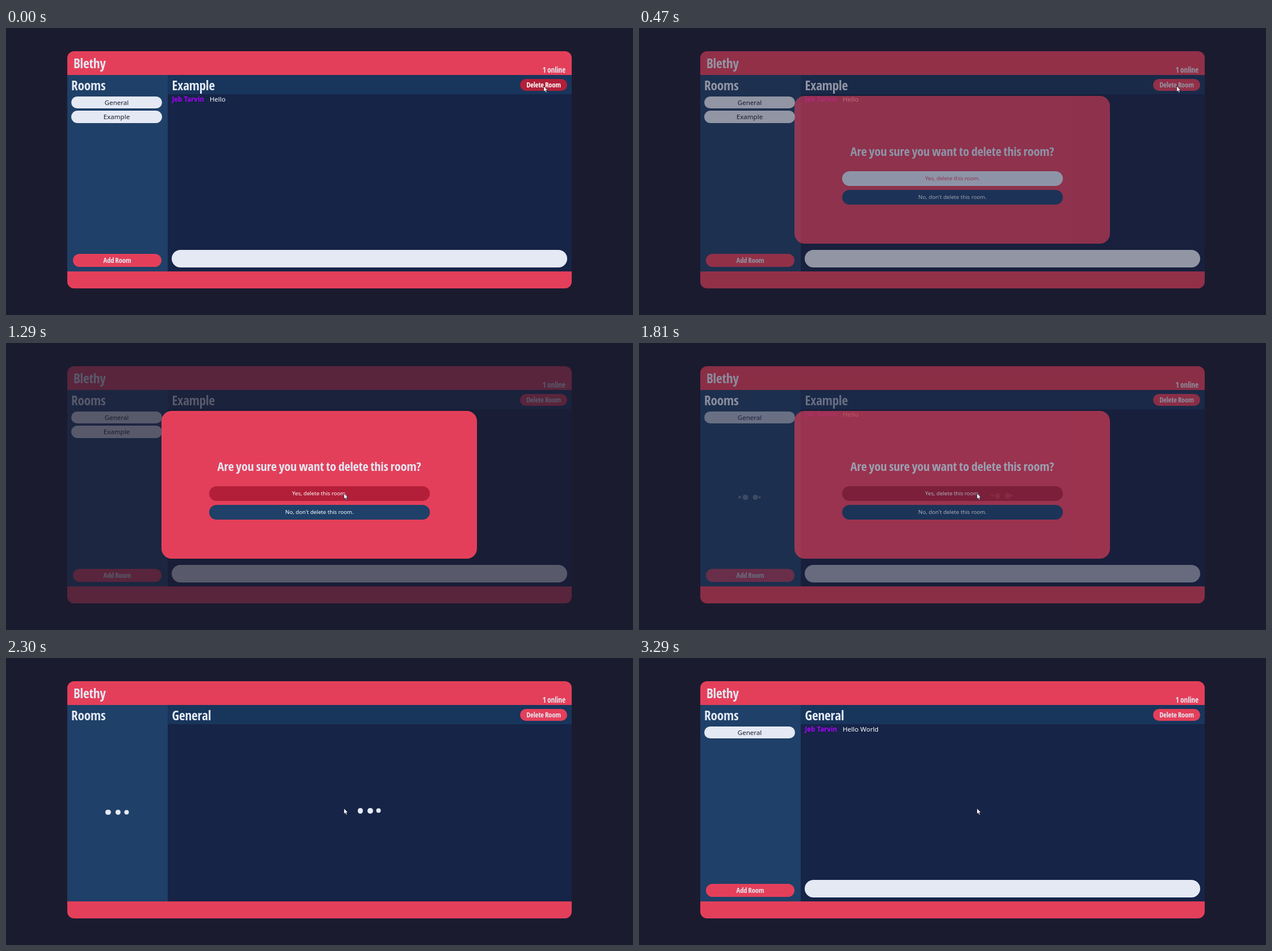
These frames come from a looping animation (1105x507 px, 3580 ms). An HTML page:

```html
<!DOCTYPE html>
<html lang="en">
<head>
<meta charset="utf-8">
<title>Chat rooms</title>
<style>
html, body { margin: 0; width: 100%; height: 100%; overflow: hidden; background: #1b1b2f; }
div { position: absolute; box-sizing: border-box; white-space: nowrap; text-align: center; }
#stage { left: 0; top: 0; width: 1105px; height: 507px; overflow: hidden; color: #e4e9f4;
  font: 11.52px "Noto Sans", "Open Sans", sans-serif; }
.layer { left: 0; top: 0; width: 1105px; height: 507px; }
.head { font-family: "Asap Condensed", "Open Sans Condensed", "Roboto Condensed", Roboto, sans-serif;
  font-weight: 700; font-stretch: 75%; word-spacing: -.06em;
  font-size: calc(var(--size) * var(--shrink, 1)); letter-spacing: var(--track, 0); }
.big { --size: 24.8px; }
.ask { --size: 23.5px; }
.note { --size: 14.2px; }
.label { --size: 13.3px; }
.left { text-align: left; }
.right { text-align: right; }
.red { background: #e43f5a; }
.side { background: #1f4068; }
.bar { background: #18355c; }
.main { background: #162447; }
.top { border-radius: 12px 12px 0 0; }
.bottom { border-radius: 0 0 12px 12px; }
.pill { border-radius: 16px; }
.light { background: #e4e9f4; color: #1b1b2f; }
.card { border-radius: 18px; }
.choice { font-size: 9.6px; color: #fff; }
.yes { background: #e4e9f4; color: #e43f5a; }
.no { font-weight: 500; }
.name { color: #aa00ff; font-weight: 700; }
.said { color: #fff; }
.dot { border-radius: 50%; background: #e4e9f4; }
.hover { background: #b31f39; color: #fff; }
svg { position: absolute; left: 0; top: 0; overflow: visible; }
</style>
</head>
<body>
<div id="stage"></div>
<script>
const stage = document.getElementById('stage');

function box(parent, x, y, w, h, cls, text = '') {
  const el = document.createElement('div');
  el.className = cls;
  el.textContent = text;
  el.style.cssText = `left:${x}px;top:${y}px;width:${w}px;height:${h}px;line-height:${h}px`;
  return parent.appendChild(el);
}
const layer = parent => box(parent, 0, 0, 1105, 507, 'layer');

// Application window
const app = layer(stage);
box(app, 108, 41, 889, 42, 'red top');
box(app, 108, 83, 177, 347, 'side');
box(app, 285, 83, 712, 34, 'bar');
box(app, 285, 117, 712, 313, 'main');
box(app, 108, 430, 889, 30, 'red bottom');
box(app, 119, 47, 0, 30, 'head big left', 'Blethy');
box(app, 886, 64, 100, 20, 'head note right', '1 online');
box(app, 115, 86, 0, 30, 'head big left', 'Rooms');
const remove = box(app, 906, 90, 83, 21, 'red pill head label', 'Delete Room');
const heading = box(app, 292.5, 86, 0, 30, 'head big left', 'Example');

// Parts hidden while loading
const content = layer(app);
box(content, 115, 121, 160, 21, 'pill light', 'General');
const room = box(content, 115, 146, 160, 22, 'pill light', 'Example');
box(content, 118, 399, 156, 23, 'red pill head label', 'Add Room');
box(content, 292.5, 116, 0, 19, 'name left', 'Jeb Tarvin');
const message = box(content, 359, 116, 0, 19, 'said left', 'Hello');
box(content, 292, 392, 697, 31, 'pill light');

// Two identical loaders
const loader = layer(app);
const dots = [[178, 272.5], [622.6, 270]].map(([x, y]) =>
  [0, 0, 1, 2].map(i => box(loader, x + i * 17.28 - 4.7, y - 4.7, 9.4, 9.4, 'dot')));

// Confirmation dialog
const dialog = layer(stage);
box(dialog, 274, 120, 556, 261, 'red card');
const question = box(dialog, 274, 202, 556, 30, 'head ask', 'Are you sure you want to delete this room?');
const yes = box(dialog, 358, 253, 389, 26, 'pill choice yes', 'Yes, delete this room.');
box(dialog, 358, 286, 389, 26, 'pill choice side no', "No, don't delete this room.");

stage.insertAdjacentHTML('beforeend',
  `<svg width="10" height="14"><path d="M0 0V10.2L2.4 8.2 4 11.7 5.8 10.9 4.2 7.5H7.3Z"
    fill="#fff" stroke="#15152a" stroke-width=".8"/></svg>`);
const cursor = stage.lastElementChild;

// Smaller, tighter headings when only a wide face is available
function tightenHeads() {
  const range = document.createRange();
  range.selectNodeContents(question);
  const width = range.getBoundingClientRect().width, goal = 359, size = 23.5;
  const shrink = Math.min(1.04, (goal / width) ** 0.75);
  const track = (goal / shrink - width) / size / question.textContent.length;
  stage.style.setProperty('--shrink', shrink);
  stage.style.setProperty('--track', track + 'em');
}
tightenHeads();

const ramp = (t, a, b) => Math.min(1, Math.max(0, (t - a) / (b - a)));

// cubic-bezier(0, 1, 1, 0)
function ellipsisEase(p) {
  let lo = 0, hi = 1;
  for (let i = 0; i < 24; i++) {
    const s = (lo + hi) / 2;
    if (3 * s * s - 2 * s ** 3 < p) lo = s; else hi = s;
  }
  return 3 * lo - 6 * lo * lo + 4 * lo ** 3;
}

const cycles = [1316, 1916, 2298.5, 2800, 3300, 3800];

function drawDots(t) {
  const i = Math.max(0, cycles.findLastIndex(c => c <= t));
  const e = ellipsisEase(ramp(t, cycles[i], cycles[i + 1]));
  for (const [first, second, third, last] of dots) {
    first.style.transform = `scale(${e})`;
    second.style.transform = third.style.transform = `translateX(${e * 17.28}px)`;
    last.style.transform = `scale(${1 - e})`;
  }
}

function drawCursor(t) {
  const p = ramp(t, 720, 1190), e = p * p * (3 - 2 * p);
  const curve = (a, b, c) => (1 - e) ** 2 * a + 2 * e * (1 - e) * b + e * e * c;
  const x = curve(947.5, 700, 595.5), y = curve(102.5, 250, 265.5);
  cursor.style.transform = `translate(${x}px, ${y}px)`;
  yes.classList.toggle('hover', t < 2150 && y >= 253);
}

function draw(t) {
  const shown = ramp(t, 180, 680) - ramp(t, 1630, 2130);
  const loading = ramp(t, 1660, 2160) - ramp(t, 2800, 3280);
  const moved = t >= 2160;
  app.style.opacity = 1 - 0.7 * shown;
  dialog.style.opacity = shown;
  content.style.opacity = 1 - loading;
  loader.style.opacity = loading;
  heading.textContent = moved ? 'General' : 'Example';
  heading.style.opacity = moved ? ramp(t, 2160, 2290) : 1 - loading;
  message.textContent = moved ? 'Hello World' : 'Hello';
  room.style.visibility = t < 1620 ? 'visible' : 'hidden';
  remove.classList.toggle('hover', t < 200);
  drawDots(t);
  drawCursor(t);
}

const start = performance.now();
function tick() {
  draw((performance.now() - start) % 3580);
  requestAnimationFrame(tick);
}
tick();
</script>
</body>
</html>
```
